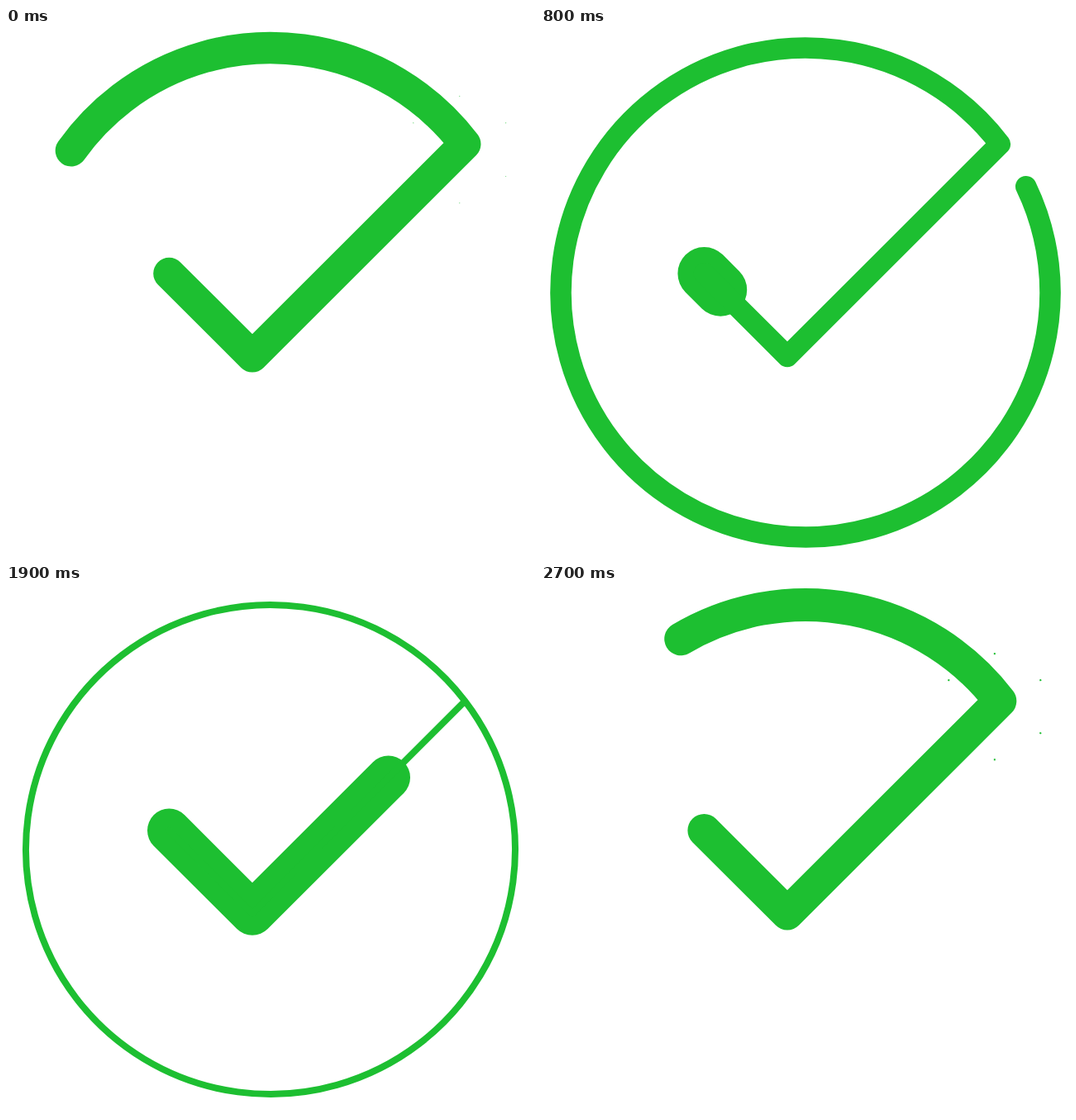
Animation, 640 px wide and 640 px high, one loop 2800 ms. Source, as an HTML page:

```html
<!DOCTYPE html>
<html lang="en">
<head>
<meta charset="utf-8">
<title>Check mark loop</title>
<style>
  html, body { margin: 0; width: 100%; height: 100%; overflow: hidden; background: #fff; }
  svg { display: block; width: 100vw; height: 100vh; }
  path { fill: none; stroke: #1dbf31; stroke-linecap: round; stroke-linejoin: round; }
  rect { fill: #1dbf31; }
</style>
</head>
<body>
<svg viewBox="0 0 640 640"></svg>
<script>
const LOOP = 2800, STEP = 100;
const TRACE = 'M197.4 297L298 397.4L555.3 140.4A296 296 0 0 0 84.7 499.6A296 296 0 0 0 555.3 140.4';
const svg = document.querySelector('svg');

function add(name, attrs) {
  const el = document.createElementNS('http://www.w3.org/2000/svg', name);
  set(el, attrs);
  return svg.appendChild(el);
}

function set(el, attrs) {
  for (const key in attrs) el.setAttribute(key, attrs[key]);
}

const strokes = [0, 1].map(() => add('path', { d: TRACE }));
const sparks = Array.from({ length: 6 }, () => add('rect', {}));

const clamp = x => Math.min(1, Math.max(0, x));
const easeInOut = (x, power) =>
  x < .5 ? (2 * x) ** power / 2 : 1 - (2 - 2 * x) ** power / 2;

// Drawn length: first the tick, then the sweep around the ring.
function drawnLength(age) {
  return 339 * clamp((age - 400) / 1200) ** 2.27
    + 2686 * easeInOut(clamp((age - 1600) / 3200), 2.165);
}

function drawStroke(path, age) {
  const length = drawnLength(age);
  const width = 64 * clamp((5200 - age) / 4000);
  set(path, {
    'stroke-dasharray': `${length} 9999`,
    'stroke-width': width,
    visibility: length > 0 && width > 0 ? 'visible' : 'hidden'
  });
}

function drawSpark(rect, index, age) {
  const left = (2870 - age) / 670;
  const size = age < 2000 ? 0 : Math.max(0, 7.6 * left);
  const radius = 64.7 - 9.7 * left * left;
  set(rect, {
    x: -size / 2, y: -radius - size * .56,
    width: size, height: size * 1.12,
    transform: `translate(548.8 147.2) rotate(${index * 60})`
  });
}

function render(now) {
  const time = Math.floor(now / STEP) * STEP % LOOP;
  strokes.forEach((path, i) => drawStroke(path, time + i * LOOP));
  const sparkAge = time < 400 ? time + LOOP : time;
  sparks.forEach((rect, i) => drawSpark(rect, i, sparkAge));
}

const start = performance.now();
function tick() {
  render(performance.now() - start);
  requestAnimationFrame(tick);
}
tick();
</script>
</body>
</html>
```
